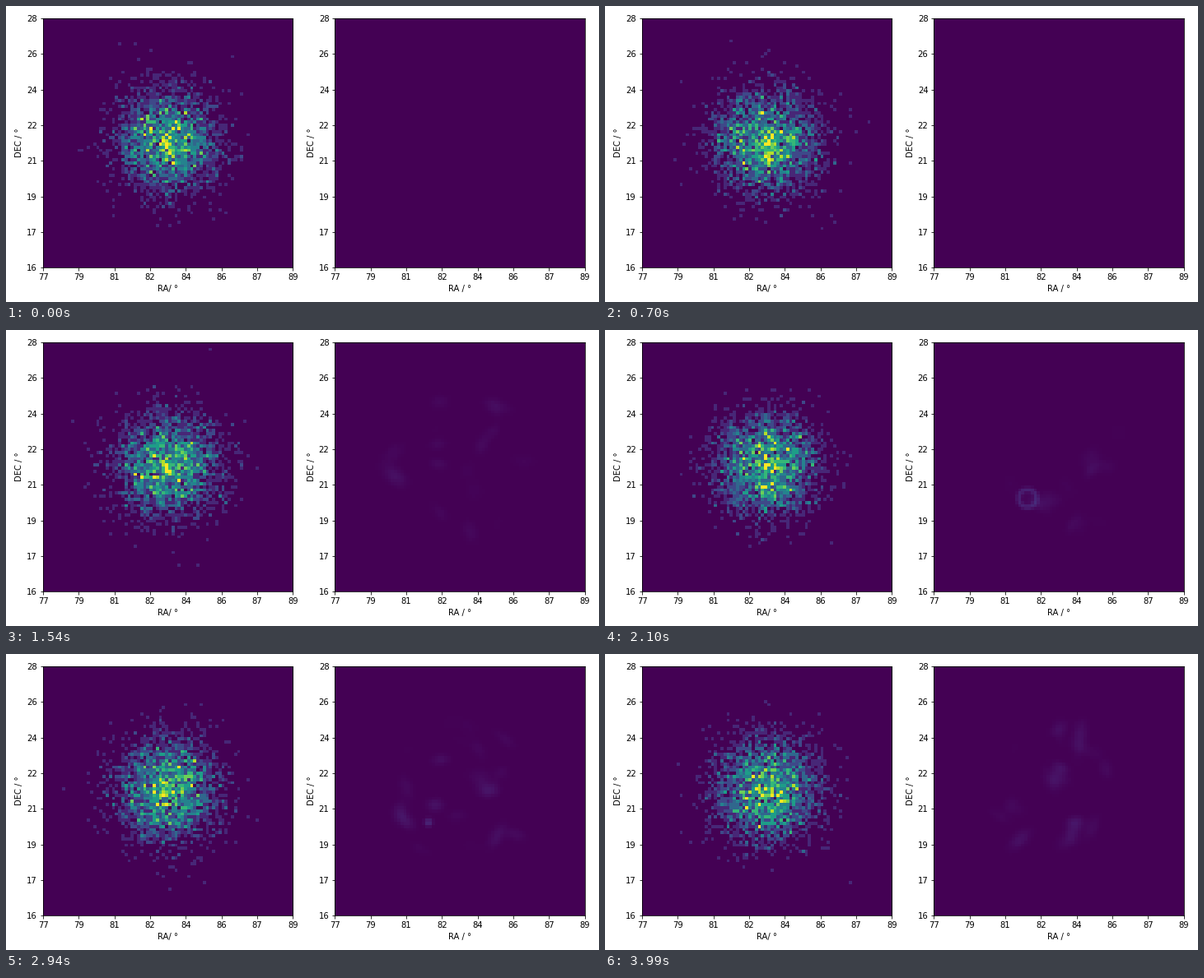
Write a matplotlib script that moves like this. It is 720x360 px and loops after 4.06 s.

```python
import numpy as np
import matplotlib.pyplot as plt
from matplotlib.animation import FuncAnimation

FRAMES, STEP = 58, 70
BINS = 80
W, H, DPI = 720, 360, 72
SIDE = 303.2
SOURCE = (39.7, 40.0)
BURST = (30.0, 29.8)
PEAK = 36            # step at which the burst is brightest
WARM_UP = 18         # the filtered view is empty before this step

plt.rcParams.update({"font.family": "DejaVu Sans", "font.size": 10})

yy, xx = np.mgrid[0:BINS, 0:BINS] + 0.5


def radius(center):
    return np.hypot(xx - center[0], yy - center[1])


def bump(center, sigma):
    return np.exp(-(radius(center) / sigma) ** 2 / 2)


def pulse(f, middle, width, power=2):
    return np.exp(-(abs(f - middle) / width) ** power)


# Flat-topped camera acceptance, a faint halo and one steady source
FIELD = 5.0 * np.exp(-(radius((40, 40.3)) / 13.5) ** 2.4)
FIELD += 0.02 * bump((40, 40), 13) + 3.5 * bump(SOURCE, 1.2)
FLARE = bump(BURST, 1.3)
RING = np.exp(-((radius(BURST) - 2.8) / 0.9) ** 2)
DOT = bump(BURST, 0.8)


def make_blobs(count=120):
    """Short-lived filter residue scattered over the cloud."""
    rng = np.random.default_rng(5)
    blobs = []
    for _ in range(count):
        r, a = 23 * np.sqrt(rng.random()), rng.uniform(0, 2 * np.pi)
        dx = xx - 40 - r * np.cos(a)
        dy = yy - 40 - r * np.sin(a)
        turn = rng.uniform(0, np.pi)
        u = dx * np.cos(turn) + dy * np.sin(turn)
        v = dy * np.cos(turn) - dx * np.sin(turn)
        shape = np.exp(-((u / rng.uniform(1.8, 3)) ** 2
                         + (v / rng.uniform(1.2, 1.8)) ** 2) / 2)
        blobs.append((rng.uniform(WARM_UP - 2, FRAMES + 2),
                      rng.uniform(0.012, 0.05) * shape))
    return blobs


BLOBS = make_blobs()


def burst(f):
    return pulse(f, PEAK, 4, 4)


def counts(f):
    rng = np.random.default_rng(400 + f)
    return rng.poisson(FIELD + 6 * burst(f) * FLARE)


def residual(f):
    if f < WARM_UP:
        return np.zeros((BINS, BINS))
    noise = sum(pulse(f, t, 2.5) * shape for t, shape in BLOBS)
    return (noise + burst(f) * FLARE
            + 0.09 * pulse(f, PEAK - 6, 2) * RING
            + 0.11 * pulse(f, PEAK + 6, 2) * DOT)


def panel(left, xlabel, vmax):
    ax = fig.add_axes([left / W, 41.8 / H, SIDE / W, SIDE / H])
    image = ax.imshow(np.zeros((BINS, BINS)), cmap="viridis", vmin=0,
                      vmax=vmax, origin="lower", aspect="auto",
                      interpolation="nearest", extent=(0, BINS, 0, BINS))
    ticks = np.linspace(0, BINS, 8)
    ax.set_xticks(ticks, [77, 79, 81, 82, 84, 86, 87, 89])
    ax.set_yticks(ticks, [16, 17, 19, 21, 22, 24, 26, 28])
    ax.set_xlabel(xlabel)
    ax.set_ylabel("DEC / °")
    return image


fig = plt.figure(figsize=(W / DPI, H / DPI), dpi=DPI, facecolor="white")
sky = panel(45.1, "RA/ °", 9)
filtered = panel(399.4, "RA / °", 1)


def draw(f):
    sky.set_data(counts(f))
    filtered.set_data(residual(f))
    return sky, filtered


anim = FuncAnimation(fig, draw, frames=FRAMES, interval=STEP,
                     init_func=lambda: draw(0), repeat=True, repeat_delay=0)
plt.show()
```
